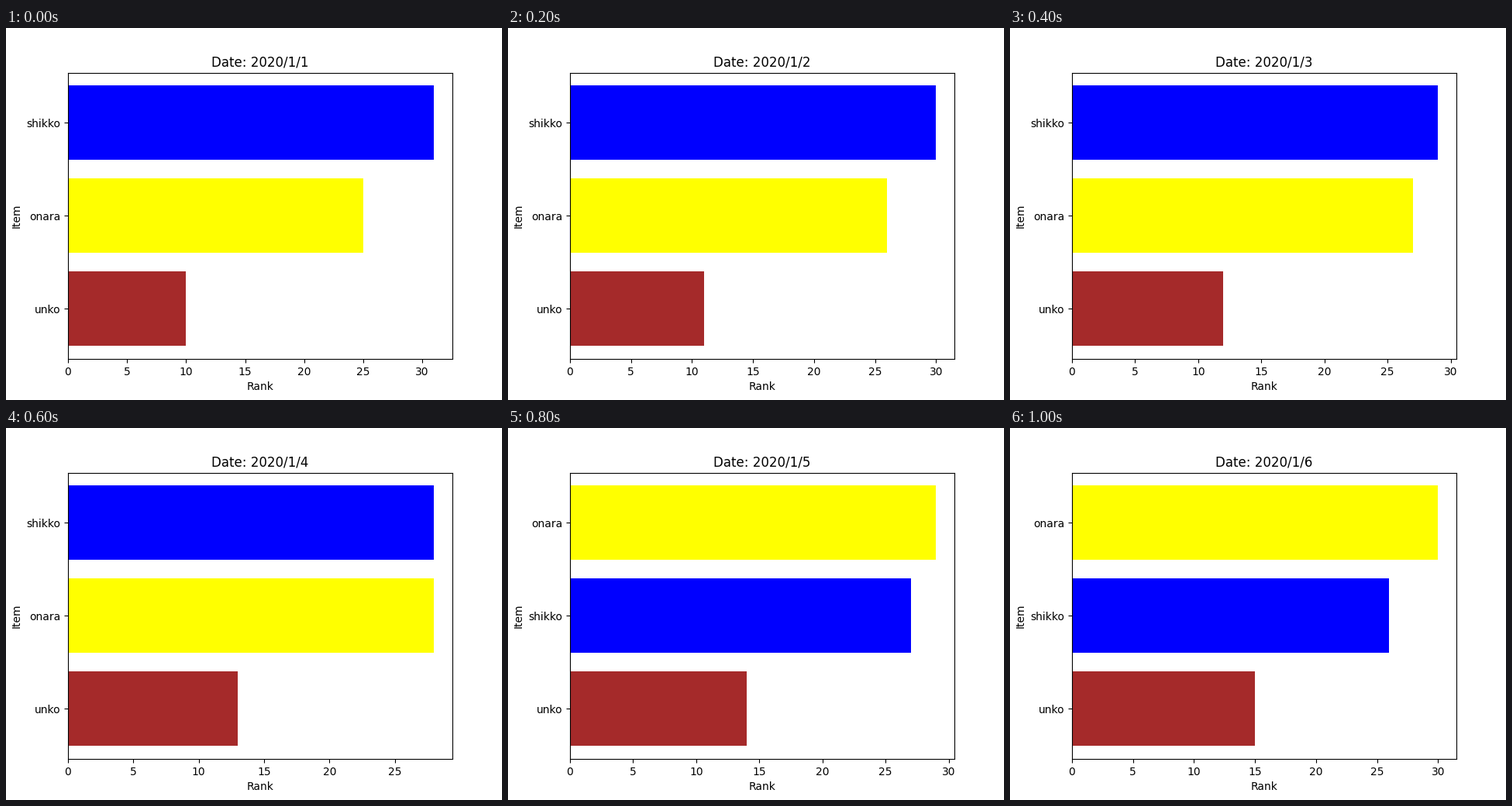
Recreate the animation shown at these times as a matplotlib script. Size 640 px wide and 480 px high, loop 1200 ms.

```python
import matplotlib.pyplot as plt
from matplotlib.animation import FuncAnimation

DAYS = 6
DAY_MS = 200

# name: (colour, value on the first day, change per day)
ITEMS = {
    "unko": ("brown", 10, 1),
    "onara": ("yellow", 25, 1),
    "shikko": ("blue", 31, -1),
}

plt.rcParams["font.family"] = "DejaVu Sans"
fig, ax = plt.subplots(figsize=(6.4, 4.8), dpi=100)


def ranking(day):
    """Return (name, value, colour) rows, smallest value first."""
    rows = [(name, start + step * day, colour)
            for name, (colour, start, step) in ITEMS.items()]
    return sorted(rows, key=lambda row: row[1])


def draw(day):
    ax.clear()
    names, values, colours = zip(*ranking(day))
    ax.barh(names, values, color=colours)
    ax.set_title(f"Date: 2020/1/{day + 1}")
    ax.set_xlabel("Rank")
    ax.set_ylabel("Item")


anim = FuncAnimation(fig, draw, frames=DAYS, interval=DAY_MS,
                     init_func=lambda: draw(0), repeat=True, repeat_delay=0)
plt.show()
```
